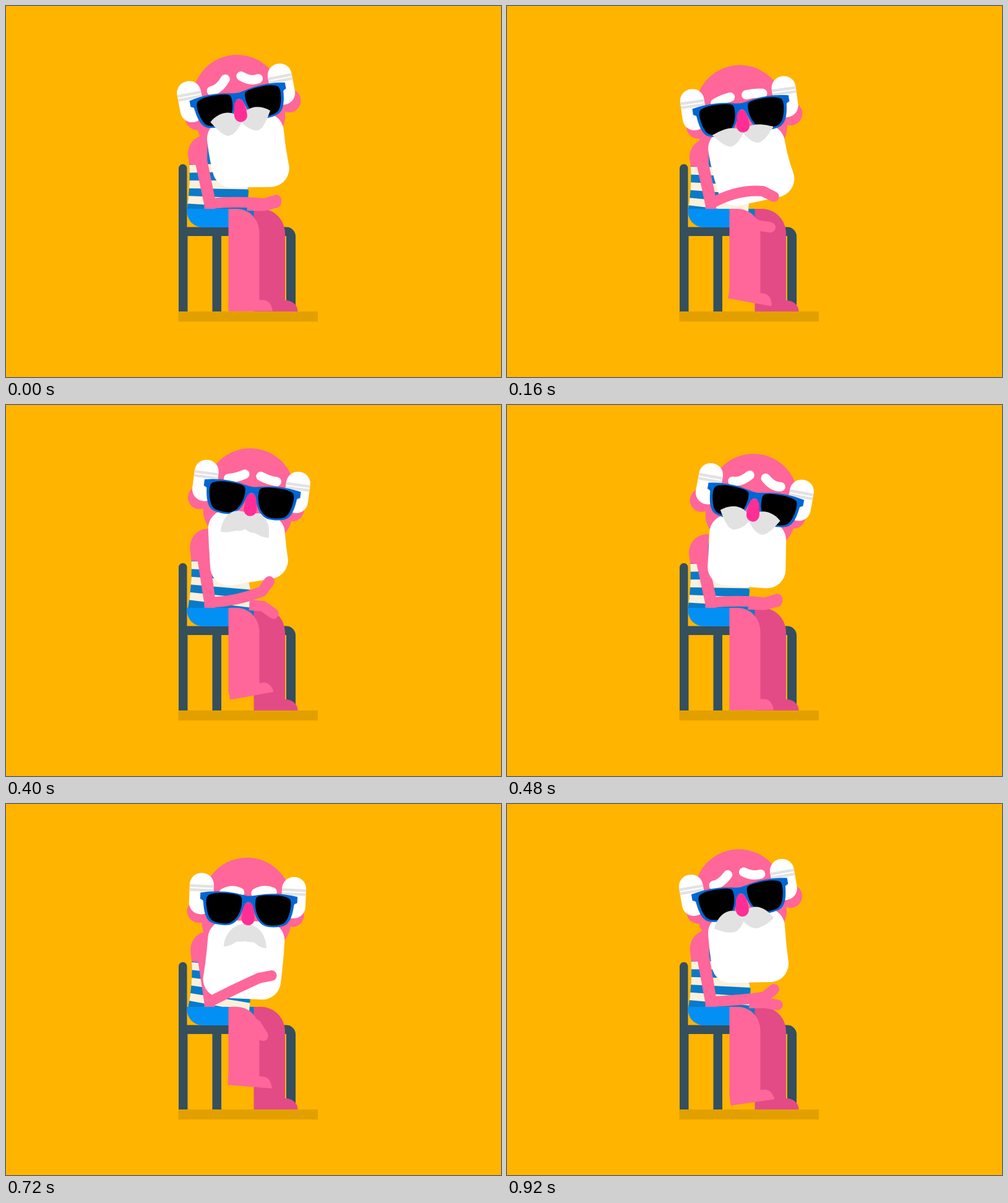
Write an HTML page that moves like this. It is 800x600 px and loops after 960 ms.

```html
<!DOCTYPE html>
<html lang="en">
<head>
<meta charset="utf-8">
<title>Sitting man</title>
<style>
  html, body { margin: 0; width: 100%; height: 100%; overflow: hidden; background: #ffb400; }
  svg { display: block; width: 100vw; height: 100vh; }
  .skin { fill: #ff669a; }
  .arm { fill: none; stroke: #ff669a; stroke-width: 17; stroke-linecap: round; stroke-linejoin: round; }
  .brow { fill: none; stroke: #fff; stroke-width: 15; stroke-linecap: round; }
</style>
</head>
<body>
<svg viewBox="0 0 800 600">
  <defs>
    <clipPath id="shirtClip"><path id="shirt"/></clipPath>
    <g id="tuft">
      <rect x="-19.5" y="-44" width="39" height="67" rx="19" fill="#fff"/>
      <path d="M-19.5 -22.7H19.5M-19.5 -16.3H19.5" stroke="#e2e2e2" stroke-width="4.4"/>
    </g>
    <g id="lens">
      <path fill="#0066d3" d="M-.3 -10C8 -10 20 -14.5 38 -15.3C54 -16 66 -14.5 78.5 -12V-2C76 -1 74 0 73.5 1
        C72 16 69 30 60 35C52 39 36 40 28 37.5C16 33 11 20 8 10C6 3 4 0 -.3 0Z"/>
      <path d="M12 -7C13 -11 22 -12.5 38 -13C54 -13.5 62 -11 66 -8C69 -5 69 2 68 8C66 22 62 30 56 33
        C50 36 36 37 30 35C18 31 10 14 11 -2C11 -4 11 -5 12 -7Z"/>
    </g>
    <path id="half" fill="#e2e2e2"/>
  </defs>

  <rect width="800" height="600" fill="#ffb400"/>
  <rect x="278.5" y="494" width="225.5" height="16.3" fill="#e2a000"/>
  <path fill="#344f5e" d="M279 494V262.5A6.75 6.75 0 0 1 292.5 262.5V357.5H453
    A15 15 0 0 1 468 372.5V494H453V372H348V494H333.5V372H293.5V494Z"/>

  <rect x="340" y="328" width="61" height="30" fill="#0a7cc8"/>
  <path fill="#e34b86" d="M400.5 328H411C434 328 451 346 451 368V476C463 476 471.5 484 471.5 494H400.5Z"/>
  <path id="backArm" class="arm"/>

  <g clip-path="url(#shirtClip)">
    <rect x="280" y="190" width="140" height="150" fill="#0a7ac8"/>
    <path id="stripes" fill="#fbf0dc"/>
  </g>
  <path fill="#0390f5" d="M292.300 328H360V358H320C303 358 292.300 347 292.300 330Z"/>

  <path id="leg" class="skin"/>
  <path id="foot" class="skin" d="M-25 14V-4H32C40 -4 46 5 46.5 14Z"/>
  <path id="upperArm" class="skin"/>

  <g id="headBack">
    <g id="ears" class="skin"><circle cx="-75.5" cy="18" r="19"/><circle cx="75.5" cy="18" r="19"/></g>
    <path class="skin" d="M-72 0A72 72 0 0 1 72 0V34A72 52 0 0 1 -72 34Z"/>
    <use href="#tuft" x="-74.3"/>
    <use href="#tuft" x="75"/>
    <path id="browL" class="brow"/>
    <path id="browR" class="brow"/>
  </g>
  <path id="beard" fill="#fff" stroke="#fff" stroke-width="60" stroke-linejoin="round"/>
  <g id="headFront">
    <g transform="translate(2.6 0)"><use href="#lens"/><use href="#lens" transform="scale(-1 1)"/></g>
    <use href="#half"/>
    <use href="#half" transform="scale(-1 1)"/>
    <path id="nose" fill="#ff2e96" d="M0 1C6 1 8 6 9 14C10 20 10.5 24 10.5 27A10.5 10.5 0 0 1 -10.5 27
      C-10.5 24 -10 20 -9 14C-8 6 -6 1 0 1Z"/>
  </g>
  <path id="foreArm" class="arm"/>
</svg>
<script>
  const LOOP = 960, STEP = 40, FLOOR = 494;
  const RAD = Math.PI / 180;
  let time = 0;

  const $ = id => document.getElementById(id);
  const set = (id, d) => $(id).setAttribute('d', d);
  const move = (id, v) => $(id).setAttribute('transform', v);

  // Oscillation around mean, highest at the time peak
  const wave = (mean, amp, peak, period) => mean + amp * Math.cos(2 * Math.PI * (time - peak) / period);
  const beat = (mean, amp, peak) => wave(mean, amp, peak, LOOP / 2);
  const sway = (mean, amp, peak) => wave(mean, amp, peak, LOOP);

  // Point at an angle in degrees and a distance from x, y
  const polar = (x, y, angle, r) => [x + r * Math.cos(angle * RAD), y + r * Math.sin(angle * RAD)];

  // Cream bands that widen towards the belly
  function makeStripes() {
    const high = 12.3, fan = y => y + (y - 24) * .2;
    let d = '';
    for (let k = 0; k < 3; k++) {
      const a = (2 * k - 1) * high, b = a + high;
      d += `M-12 ${a}L110 ${fan(a)}V${fan(b)}L-12 ${b}Z`;
    }
    set('stripes', d);
  }

  function drawBody() {
    const x = beat(296.1, 3.3, 310), y = beat(207.2, 9.6, 108);
    const top = 265.3 + (y - 199) * .5;
    set('shirt', `M${x + 2} ${top - 14}Q${x + 4} ${top + 20} ${293 + (x - 295) * .5} 328
      L300 334H${x + 95}L${x + 98} 300L${x + 80} ${y + 15}H${x + 26}Z`);
    move('stripes', `translate(297 ${top}) matrix(1 ${beat(.08, .075, 285)} 0 1 0 0)`);
    set('upperArm', `M${x + 32} ${y}C${x + 10} ${y} ${x} ${y + 15} ${x} ${y + 32}L${x + 2} ${top - 14}
      L${x + 12.5} ${top - 13}L320.5 322V328H338V312L${x + 31} ${y + 40}Z`);
  }

  function drawLeg() {
    const sole = Math.min(FLOOR, beat(475, 23, 48));
    const lifted = Math.min(1, (FLOOR - sole) / 10);
    const ankle = sole - 14;
    set('leg', `M359.5 328H372C394 328 409.5 345 409.5 368V${ankle}H359.5Z`);
    move('foot', `translate(384.3 ${ankle}) rotate(${beat(0, 10.3, 155) * lifted})`);
  }

  function drawArms() {
    const x = beat(413.5, 4.5, 35), y = beat(300.5, 21.5, 36);
    const hand = polar(x, y, beat(-14, 45, 125), 20);
    set('foreArm', `M330 319.5Q${(330 + x) / 2} ${(319.5 + y) / 2 + beat(-3, 13, 350)} ${x} ${y}L${hand}`);

    const by = beat(340, 18.5, 210), bx = 410 - (by - 340) * .35;
    const elbow = 322 + Math.max(0, by - 325) * .5;
    set('backArm', `M375 ${elbow}L${bx} ${by}L${polar(bx, by, beat(22, 50, 300), 21)}`);
  }

  function drawBrows() {
    const inner = beat(-25.5, 10.5, 256), outer = inner * .4 - 7;
    const mid = (inner + outer) / 2 - (inner + 25) * .7;
    set('browL', `M-38 ${outer}Q-25 ${mid} -12.5 ${inner}`);
    set('browR', `M40 ${outer - 5}Q27 ${mid - 2.5} 13.5 ${inner}`);
  }

  // Each half is a leaf whose root leads and whose tip trails
  function drawMoustache() {
    const root = beat(-3, 43, 290), tip = beat(18, 49, 313);
    const at = (angle, r) => polar(0, 37, angle, r);
    const [x, y] = at(tip * .5 + 43, 30);
    const end = 37 + Math.max(0, tip) * .55;
    set('half', `M-.3 35C${at(root - 35, 24)} ${at(root, 40)} ${at(tip, 50)}
      C${at(tip + 12, 43)} ${x * 1.4} ${y} ${x} ${y}C${x * .5} ${y} 0 ${end + 2} -.3 ${end}Z`);
  }

  function drawBeard(y, tilt) {
    const topL = [356 + .1 * tilt, y + 60 - .35 * tilt];
    const topR = [420 + .1 * tilt, y + 60 + .7 * tilt];
    const roll = sway(0, 1, 690);
    const lowL = [sway(359, 11.5, 175), beat(275, 15.5, 190) - 4 * roll];
    const lowR = [sway(424, 10.5, 185), beat(271, 17, 150) + 9 * roll];
    const side = (a, b) => [a[0] * .7 + b[0] * .3, (a[1] + b[1]) / 2];
    set('beard', `M${topL}L${topR}Q${side(topR, lowR)} ${lowR}L${lowL}Q${side(topL, lowL)} ${topL}Z`);
  }

  function drawHead() {
    const x = sway(385.8, 13, 525), y = beat(154.8, 13.1, 143), tilt = sway(-.3, 11, 520);
    const place = `translate(${x} ${y}) rotate(${tilt})`;
    move('headBack', place);
    move('headFront', place);
    move('ears', `translate(${-.6 * tilt} 0)`);
    move('nose', `translate(2.5 0) rotate(${-.3 * tilt})`);
    drawBrows();
    drawMoustache();
    drawBeard(y, tilt);
  }

  const start = performance.now();
  function frame(now) {
    time = Math.floor(Math.max(0, now - start) / STEP) * STEP % LOOP;
    drawBody();
    drawLeg();
    drawArms();
    drawHead();
    requestAnimationFrame(frame);
  }
  makeStripes();
  frame(start);
</script>
</body>
</html>
```
